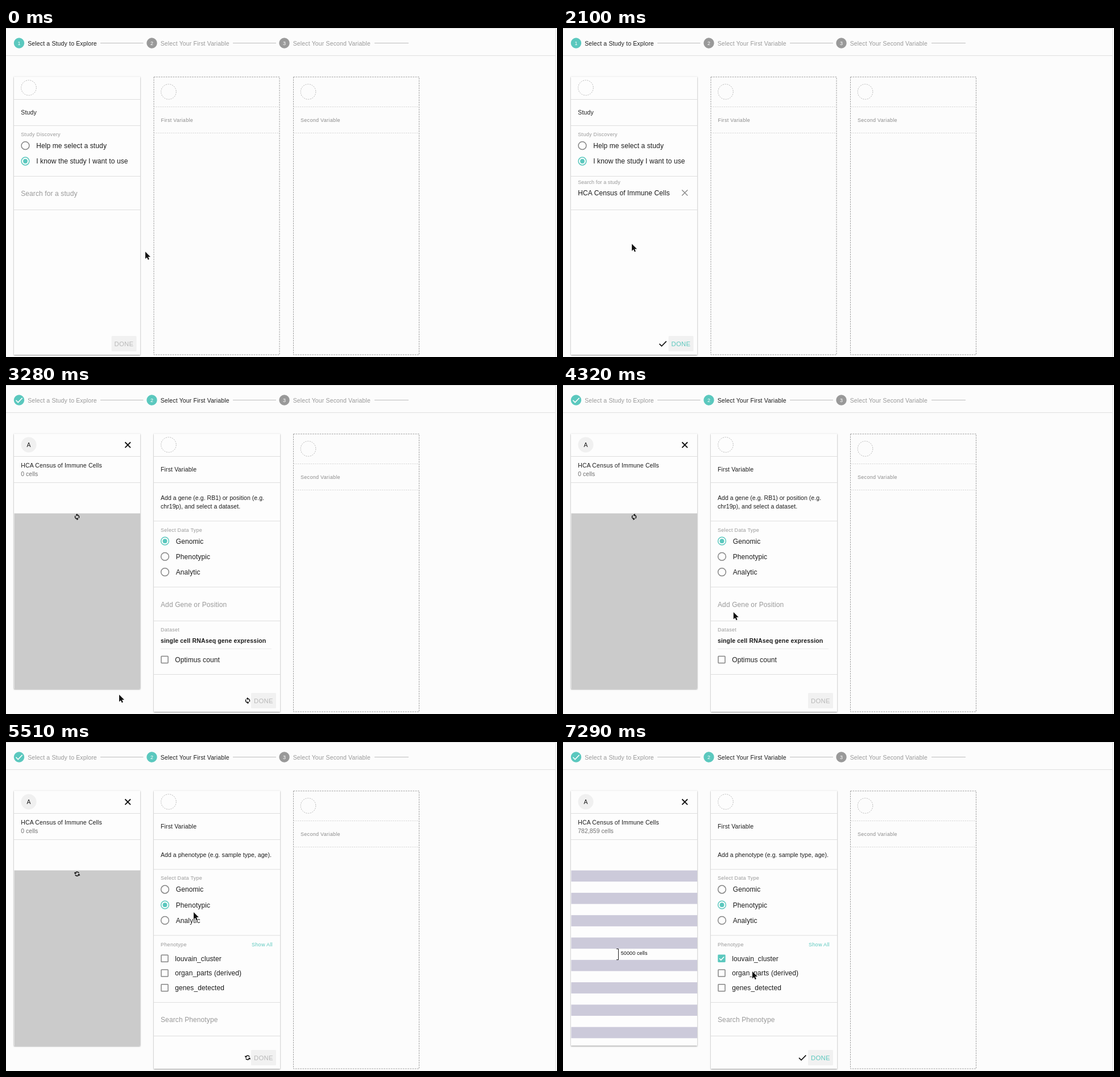
Animation, 969 px wide and 578 px high, one loop 8000 ms. Source, as an HTML page:

```html
<!DOCTYPE html>
<html lang="en">
<head>
<meta charset="utf-8">
<title>Study picker</title>
<style>
  html, body { margin: 0; width: 100%; height: 100%; overflow: hidden; background: #fcfcfc; }
  svg { display: block; font-family: "Liberation Sans", Arial, sans-serif; }
  .card { fill: #fdfdfd; filter: drop-shadow(0 1px 1.2px rgba(0, 0, 0, .42)); }
  .menu { fill: #fff; filter: drop-shadow(0 1px 1.5px rgba(0, 0, 0, .5)); }
</style>
</head>
<body>
<svg id="stage" width="969" height="578" viewBox="0 0 969 578"></svg>
<script>
const LOOP = 8000;
const TEAL = '#5bc8be', INK = '#1c1c1c', GREY = '#999', RULE = '#dedede';

// Bursts of screen updates: first time, last time, count
const bursts = [
  [150, 470, 3], [770, 1810, 8], [1950, 2690, 6], [2980, 3880, 7],
  [4030, 5070, 8], [5210, 6110, 7], [6260, 7290, 8]
];
const ticks = [0];
for (const [a, b, n] of bursts)
  for (let i = 0; i < n; i++) ticks.push(Math.round((a + (b - a) * i / (n - 1)) / 10) * 10);

// Interface events
const OPEN = 770, PICK = 1950, PRESS = 2980, NEXT = 3280, READY = 3580,
      PHENO = 5510, LOADED = 5810, CHECK = 6710;

// Pointer path: time, x, y
const path = [
  [0, 245, 393], [90, 245, 393], [470, 108, 286], [1070, 108, 286], [1360, 112, 359],
  [1660, 121, 379], [2090, 121, 379], [2690, 199, 547], [3130, 199, 547], [3280, 199, 544],
  [3430, 203, 538], [3880, 288, 422], [4030, 298, 405], [5070, 330, 299], [5510, 330, 299],
  [6110, 335, 402], [6260, 328, 399], [6560, 281, 379], [6860, 281, 379], [7290, 333, 403]
];

const ease = p => p * p * (3 - 2 * p);
const mix = (a, b, p) => a + (b - a) * p;

function pointerAt(t) {
  for (let i = 1; i < path.length; i++) {
    const [t0, x0, y0] = path[i - 1], [t1, x1, y1] = path[i];
    if (t < t1) {
      const p = ease((t - t0) / (t1 - t0));
      return [mix(x0, x1, p), mix(y0, y1, p)];
    }
  }
  return path[path.length - 1].slice(1);
}

// Drawing helpers
const text = (x, y, s, size = 10.5, fill = INK, gap = .15, more = '') =>
  `<text x="${x}" y="${y}" font-size="${size}" fill="${fill}" letter-spacing="${gap}" ${more}>${s}</text>`;
const body = (x, y, s, fill = INK) => text(x, y, s, 12, fill, .11);
const small = (x, y, s, fill = GREY) => text(x, y, s, 9, fill, .3);
const rect = (x, y, w, h, fill, more = '') =>
  `<rect x="${x}" y="${y}" width="${w}" height="${h}" fill="${fill}" ${more}/>`;
const circle = (x, y, r, fill, more = '') =>
  `<circle cx="${x}" cy="${y}" r="${r}" fill="${fill}" ${more}/>`;
const line = (d, stroke = RULE, width = 1, more = '') =>
  `<path d="${d}" fill="none" stroke="${stroke}" stroke-width="${width}" ${more}/>`;
const rules = (x, ys) => ys.map(y => line(`M${x} ${y}h222`)).join('');
const card = (x, bottom) => `<rect class="card" x="${x}" y="85.5" width="222" height="${bottom - 85.5}"/>`;
const slot = (x, y) => circle(x, y, 13.3, 'none', 'stroke="#b5b5b5" stroke-width=".9" stroke-dasharray="2.2 1.6"');
const tick = (x, y, stroke, width = 1.7) => line(`M${x - 6} ${y + .3}l4 4l8.300-8.500`, stroke, width);
const cross = (x, y, r, stroke, width) =>
  line(`M${x - r} ${y - r}l${2 * r} ${2 * r}m0 ${-2 * r}l${-2 * r} ${2 * r}`, stroke, width);

function radio(x, y, label, on) {
  return circle(x, y, 6.9, 'none', `stroke="${on ? TEAL : '#858585'}" stroke-width="1.5"`) +
    (on ? circle(x, y, 3.9, TEAL) : '') + body(x + 19.2, y + 4.3, label);
}

function checkbox(y, label, on) {
  const box = on
    ? rect(272.3, y - 6.700, 13.4, 13.4, TEAL, 'rx="1.4"') + line(`M275 ${y}l2.800 2.900l5.400-5.600`, '#fff', 1.5)
    : rect(273, y - 6, 12, 12, 'none', 'rx=".8" stroke="#858585" stroke-width="1.5"');
  return box + body(297.2, y + 4.4, label);
}

function done(x, on, hover) {
  return rect(x, 541, 44, 27, hover ? '#d6f2ef' : '#f1f1f1', 'rx="1.5"') +
    text(x + 5, 558.5, 'DONE', 11.25, on ? TEAL : '#b8b8b8', .3) +
    (on ? tick(x - 10, 554.5, '#111') : '');
}

function spinner(x, y, t) {
  const arc = 'M12 4V1L8 5l4 4V6c3.300 0 6 2.700 6 6c0 1-.250 2-.700 2.800l1.460 1.460' +
    'C19.540 15 20 13.600 20 12c0-4.400-3.600-8-8-8z';
  return `<g transform="translate(${x} ${y}) rotate(${(t - NEXT) * .2163}) scale(.5)" stroke="#111">` +
    [0, 180].map(a => `<path transform="rotate(${a}) translate(-12 -12)" d="${arc}"/>`).join('') + '</g>';
}

function stepper(t) {
  const second = t >= NEXT;
  const steps = [[23, 'Select a Study to Explore', !second], [256.5, 'Select Your First Variable', second],
    [489.5, 'Select Your Second Variable', false]];
  let s = line('M0 .5H966.500V578', '#e2e2e2') + line('M0 48.500H966', '#dfdfdf') +
    line('M166 26.500H241.500M399 26.500H475M648 26.500H708', '#bdbdbd');
  steps.forEach(([x, label, active], i) => {
    const past = second && i === 0;
    s += circle(x, 26.5, 9.2, active || past ? TEAL : '#999');
    s += past ? line(`M${x - 5.5} 26.800l3.700 3.700l7.500-7.700`, '#fff', 1.6)
      : text(x, 29.8, i + 1, 9, '#fff', 0, 'text-anchor="middle"');
    s += text(x + 15.2, 30.5, label, 10.5, active ? INK : GREY);
  });
  return s;
}

function emptyColumn(x, label) {
  return rect(x, 86, 221, 488, 'none', 'stroke="#9c9c9c" stroke-dasharray="2.6 1.6"') +
    line(`M${x} 138.500h221M${x} 184.500h221`, '#d2d2d2', .9, 'stroke-dasharray="2.2 1.6"') +
    slot(x + 26, 112) + small(x + 12.5, 164.5, label, '#8c8c8c');
}

function menu(y) {
  const items = ['HCA Adult Retina (Veld)', 'HCA Census of Immune Cells',
    'HCA Fetal Maternal Interface', 'HCA HPSI human cerebral org'];
  const hot = Math.max(0, Math.min(3, Math.floor((y - 320) / 39.4)));
  return '<rect class="menu" x="14" y="319.500" width="222" height="138.500"/>' +
    '<clipPath id="cut"><rect x="14" y="319.500" width="222" height="138.500"/></clipPath><g clip-path="url(#cut)">' +
    rect(14, 320 + hot * 39.4, 211, 39.4, '#f4f4f4') +
    items.map((s, i) => body(26.2, 343.4 + i * 39.4, s, '#111')).join('') + '</g>' +
    rect(225, 320, 11, 138, '#fafafa') + line('M225 320v138', '#e6e6e6') +
    rect(227.2, 322, 6, 22, '#c1c1c1', 'rx="3"');
}

function studyForm(t, y) {
  const p = ease(Math.max(0, Math.min(1, (t - OPEN + 60) / 200)));
  const picked = t >= PICK, hover = t >= 2540;
  let s = card(14, 574) + rules(14, [125.5, 171.5, 260.5, 319.5]) + slot(40, 105) +
    text(26.3, 152.3, 'Study') + small(26.3, 190.3, 'Study Discovery') +
    radio(34, 206.7, 'Help me select a study', false) +
    radio(34, 234, 'I know the study I want to use', true) +
    text(26.2, mix(295, 274.3, p), 'Search for a study', mix(12, 9, p), GREY, mix(.11, .085, p));
  if (picked) s += body(26.2, 294.2, 'HCA Census of Immune Cells') + cross(214.2, 289.5, 5, '#8a8a8a', 1.4);
  s += done(185.5, picked, hover);
  if (t >= PRESS) s += circle(198.3, 553.5, t > PRESS ? 7.8 : 3.5, TEAL, 'opacity=".85"');
  if (t >= OPEN && !picked) s += menu(y);
  return s;
}

function studyCard(t) {
  const ready = t >= LOADED;
  let s = card(14, 533.5) + rules(14, [125.5, 171.5]) + circle(40, 105, 13.5, '#f0f0f0') +
    text(40, 108.8, 'A', 10.5, INK, 0, 'text-anchor="middle"') + cross(214.2, 105.3, 4.8, '#111', 1.9) +
    text(26.2, 145, 'HCA Census of Immune Cells') +
    text(26.2, 160, ready ? '782,859 cells' : '0 cells', 10.5, '#707070', .06);
  if (!ready) return s + rect(14.5, 225.5, 221.5, 308, '#cbcbcb') + spinner(125, 231.8, t);
  for (let i = 0; i < 8; i++) s += rect(14.5, 225.6 + i * 39.3, 221.5, 19.65, '#cccada');
  return s + line('M94 363.500h3.500v19h-3.500', '#222') + text(101.7, 373.6, '50000 cells', 9, '#111', .12);
}

function variableForm(t) {
  const pheno = t >= PHENO, checked = t >= CHECK, dy = pheno ? -15.2 : 0, x = 272;
  const note = (y, s) => text(x, y, s, 10.5, INK, .06);
  let s = card(260, 574) + rules(260, [125.5, 171.5, 239 + dy, 355 + dy]) + slot(286, 105) +
    text(x, 152.3, 'First Variable') + small(x, 257.6 + dy, 'Select Data Type');
  ['Genomic', 'Phenotypic', 'Analytic'].forEach((name, i) => {
    s += radio(279.5, 274.2 + dy + i * 27.2, name, i === +pheno);
  });
  if (pheno) {
    s += note(201.8, 'Add a phenotype (e.g. sample type, age).') + rules(260, [457.5, 516.5]) +
      small(x, 358.6, 'Phenotype') + small(432, 358.6, 'Show All', TEAL) +
      checkbox(380.2, 'louvain_cluster', checked) + checkbox(406, 'organ_parts (derived)') +
      checkbox(431.8, 'genes_detected') + body(x, 492, 'Search Phenotype', GREY);
  } else {
    s += note(201.8, 'Add a gene (e.g. RB1) or position (e.g.') + note(217, 'chr19p), and select a dataset.') +
      rules(260, [414.5, 508.5]) + body(x, 389.6, 'Add Gene or Position', GREY) + small(x, 432.6, 'Dataset') +
      text(x, 453.2, 'single cell RNAseq gene expression', 10.5, INK, .15, 'font-weight="700"') +
      line('M272 463.500H467', '#ececec') + checkbox(482.4, 'Optimus count');
  }
  s += done(431, checked, false);
  if (t < READY || (pheno && t < LOADED)) s += spinner(425, 554.5, t);
  return s;
}

function pointer(t, x, y) {
  const at = `transform="translate(${x} ${y})" stroke-linejoin="round"`;
  if (t >= 470 && t < 1210)
    return `<g ${at}>` + line('M-3-7Q0-7 0-5Q0-7 3-7M0-5V5M-3 7Q0 7 0 5Q0 7 3 7', '#222', 1.1) + '</g>';
  if (t >= 2540 && t < NEXT)
    return `<path ${at} fill="#fff" stroke="#111" d="M-2 8.500V1.200C-2-.400 .3-.400 .3 1.200V5.200C.3 4 2.400 4 2.400 5.400` +
      'C2.400 4.400 4.400 4.600 4.400 6C4.600 5.200 6 5.400 6 6.800V10C6 12 4.800 12.600 4.800 14.500H-1.600' +
      'C-1.800 12.600-5 10-5 8C-5 6.600-3.200 6.800-2 8.500Z"/>';
  return `<path ${at} fill="#111" stroke="#fff" stroke-width="1.2" paint-order="stroke" ` +
    'd="M0 0V12.600L2.900 9.900L4.800 14.200L6.800 13.300L5 9.100H9Z"/>';
}

function draw(t) {
  const [x, y] = pointerAt(t);
  const columns = t < NEXT
    ? studyForm(t, y) + emptyColumn(260, 'First Variable')
    : studyCard(t) + variableForm(t);
  stage.innerHTML = stepper(t) + columns + emptyColumn(505.5, 'Second Variable') + pointer(t, x, y);
}

const stage = document.getElementById('stage');
const start = performance.now();
let shown = -1;

function frame() {
  const now = (performance.now() - start) % LOOP;
  const t = ticks.filter(k => k <= now).pop();
  if (t !== shown) draw(shown = t);
  requestAnimationFrame(frame);
}
frame();
</script>
</body>
</html>
```
